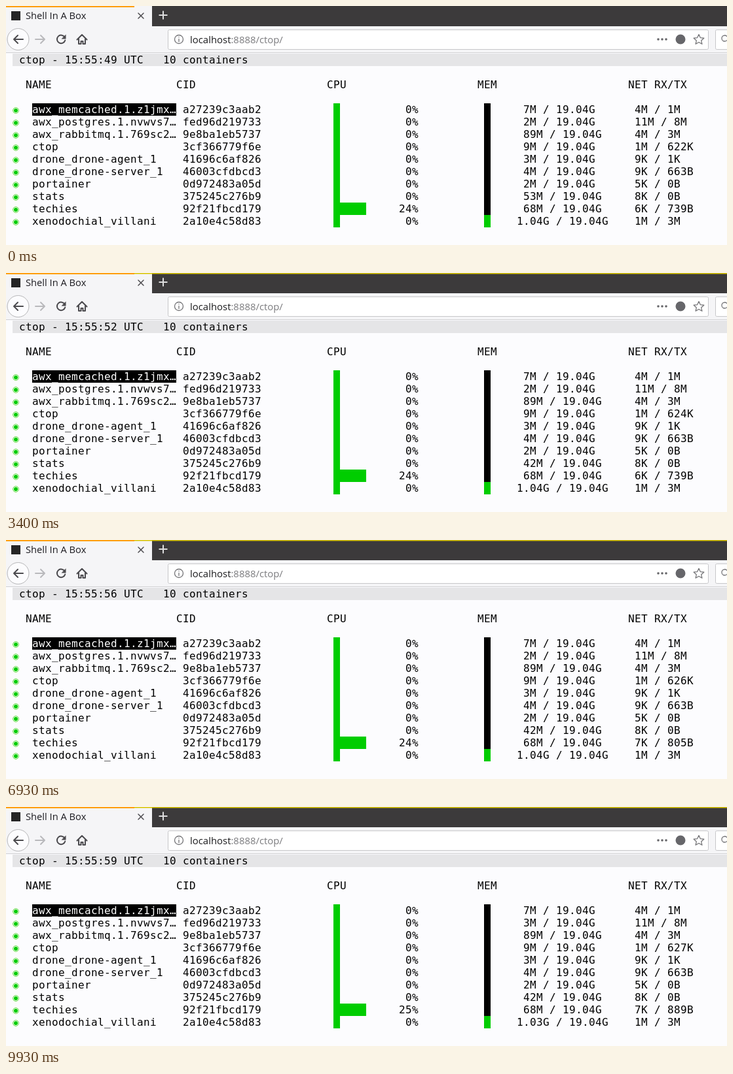
These frames come from a looping animation (1101x366 px, 9990 ms). An HTML page:

```html
<!DOCTYPE html>
<html lang="en">
<head>
<meta charset="utf-8">
<title>ctop</title>
<style>
  html, body { margin: 0; width: 100%; height: 100%; overflow: hidden; background: #fcfcfe; }
  svg { display: block; }
  text { white-space: pre; }
  .ui { font-family: "Open Sans", sans-serif; }
  .term { font: 16px "DejaVu Sans Mono", monospace; letter-spacing: .367px; }
  .icon { fill: none; stroke: #4c4b4f; stroke-width: 2; stroke-linecap: round; stroke-linejoin: round; }
  .thin { stroke-width: 1.5; }
</style>
</head>
<body>
<svg width="1101" height="366" viewBox="0 0 1101 366">
  <!-- tab strip -->
  <rect width="1101" height="31" fill="#3c3a3b"/>
  <rect width="223" height="31" fill="#f5f5f7"/>
  <rect width="196" height="2" fill="#ffa00a"/>
  <rect id="edge" x="196" width="905" height="1.5" fill="#d8c400"/>
  <rect x="8" y="8" width="14" height="14" fill="#252525"/>
  <text class="ui" x="30" y="20" font-size="14.7" fill="#1c1b20">Shell In A Box</text>
  <path class="icon thin" d="M202 11l8 8m0-8l-8 8"/>
  <path d="M233.500 14h13M240 7.500v13" stroke="#dedede" stroke-width="2"/>

  <!-- toolbar -->
  <rect y="31" width="1101" height="41" fill="#f5f5f7"/>
  <path d="M0 71.500H1101" stroke="#cfcfd2"/>
  <circle cx="18.500" cy="51" r="16.500" fill="#fcfcfe" stroke="#b4b4b6"/>
  <path class="icon" d="M26 51H12m6-6l-6 6 6 6"/>
  <path class="icon" style="stroke:#b9b9bc" d="M45 51h14m-6-6l6 6-6 6"/>
  <path class="icon" d="M89.500 47.500a6.300 6.300 0 1 0 .8 5"/>
  <path d="M91.500 43.500v7h-7z" fill="#4c4b4f"/>
  <path class="icon" d="M108.500 51.500L116 44l7.500 7.500M111 50.500V58h3.500v-4h3v4h3.500v-7.500"/>
  <rect x="247.500" y="36.500" width="825" height="30" rx="2" fill="#fff" stroke="#c6c6c9"/>
  <rect x="1083.500" y="36.500" width="30" height="30" rx="2" fill="#fff" stroke="#c6c6c9"/>
  <g class="icon" style="stroke:#747477;stroke-width:1.3">
    <circle cx="264" cy="51" r="6.500"/>
    <path d="M264 50.500v4M264 47.500v.2"/>
    <circle cx="1097.500" cy="49.500" r="4.500"/>
    <path d="M1058 43.500l2.300 5.100 5.500.6-4.100 3.700 1.200 5.400-4.900-2.800-4.900 2.800 1.200-5.400-4.100-3.700 5.500-.6z"/>
  </g>
  <text class="ui" x="281" y="56.500" font-size="14.9" fill="#1b1b1d">localhost<tspan fill="#7b7b7e">:8888/ctop/</tspan></text>
  <g fill="#66666a">
    <circle cx="996" cy="51" r="1.800"/><circle cx="1002" cy="51" r="1.800"/><circle cx="1008" cy="51" r="1.800"/>
    <circle cx="1030" cy="51" r="7.500"/>
  </g>

  <!-- terminal -->
  <rect x="10" y="73" width="1091" height="19" fill="#e5e5e7"/>
  <g id="screen" class="term"></g>
</svg>
<script>
(() => {
  const LOOP = 9990, FIRST = 670, TICK = 1000;
  const GREEN = '#00cd00';
  const CELL = 10, LINE = 19, LEFT = 10, TOP = 73;
  const screenEl = document.getElementById('screen');
  const edge = document.getElementById('edge');

  // name, container id, cpu, memory, network
  const rows = [
    ['awx_memcached.1.z1jmx…', 'a27239c3aab2', '0%', '7M', '4M / 1M'],
    ['awx_postgres.1.nvwvs7…', 'fed96d219733', '0%', '2M', '11M / 8M'],
    ['awx_rabbitmq.1.769sc2…', '9e8ba1eb5737', '0%', '89M', '4M / 3M'],
    ['ctop', '3cf366779f6e', '0%', '9M', '1M / 622K'],
    ['drone_drone-agent_1', '41696c6af826', '0%', '3M', '9K / 1K'],
    ['drone_drone-server_1', '46003cfdbcd3', '0%', '4M', '9K / 663B'],
    ['portainer', '0d972483a05d', '0%', '2M', '5K / 0B'],
    ['stats', '375245c276b9', '0%', '53M', '8K / 0B'],
    ['techies', '92f21fbcd179', '24%', '68M', '6K / 739B'],
    ['xenodochial_villani', '2a10e4c58d83', '0%', '1.04G', '1M / 3M']
  ];
  const CPU = 2, MEM = 3, NET = 4;

  // tick, row, field, new value
  const updates = [
    [2, 3, NET, '1M / 623K'], [2, 7, CPU, '1%'], [2, 7, MEM, '42M'], [2, 8, CPU, '25%'],
    [3, 3, NET, '1M / 624K'], [3, 7, CPU, '0%'], [3, 8, CPU, '24%'],
    [4, 3, NET, '1M / 625K'], [4, 8, CPU, '25%'], [4, 8, NET, '7K / 805B'],
    [6, 3, NET, '1M / 626K'], [6, 8, CPU, '24%'],
    [10, 1, MEM, '3M'], [10, 3, NET, '1M / 627K'], [10, 8, CPU, '25%'],
    [10, 8, NET, '7K / 889B'], [10, 9, MEM, '1.03G']
  ];

  function add(tag, attrs, text = '') {
    const el = document.createElementNS('http://www.w3.org/2000/svg', tag);
    for (const key in attrs) el.setAttribute(key, attrs[key]);
    el.textContent = text;
    return screenEl.appendChild(el);
  }
  const colX = col => LEFT + col * CELL;
  const lineY = line => TOP + line * LINE;
  const write = (col, line, text, fill = '#000') =>
    add('text', { x: colX(col), y: lineY(line) + 15, fill }, text);
  const block = (col, line, cols, lines, fill) =>
    add('rect', { x: colX(col), y: lineY(line), width: cols * CELL, height: lines * LINE, fill });

  const clock = write(1, 0, '');
  [[2, 'NAME'], [25, 'CID'], [48, 'CPU'], [71, 'MEM'], [94, 'NET RX/TX']]
    .forEach(([col, title]) => write(col, 2, title));

  block(3, 4, 22, 1, '#000');
  block(49, 4, 1, 10, GREEN);
  block(49, 12, 5, 1, GREEN);
  block(72, 4, 1, 9, '#000');
  block(72, 13, 1, 1, GREEN);

  const cells = rows.map(([name, id], i) => {
    const line = i + 4, cy = lineY(line) + 11;
    add('circle', { cx: 15, cy, r: 4.4, fill: 'none', stroke: '#5edc3c' });
    add('circle', { cx: 15, cy, r: 3, fill: GREEN });
    write(3, line, name, i ? '#000' : '#fff');
    write(26, line, id);
    return { cpu: write(60, line, ''), mem: write(78, line, ''), net: write(95, line, '') };
  });

  function render(tick) {
    const now = rows.map(row => row.slice());
    for (const [at, row, field, value] of updates)
      if (at <= tick) now[row][field] = value;

    clock.textContent = `ctop - 15:55:${49 + tick} UTC   10 containers`;
    now.forEach((row, i) => {
      const { cpu, mem, net } = cells[i];
      cpu.textContent = row[CPU];
      cpu.setAttribute('x', colX(62 - row[CPU].length));
      mem.textContent = row[MEM] + ' / 19.04G';
      mem.setAttribute('x', colX(row[MEM].length > 3 ? 77 : 78));
      net.textContent = row[NET];
    });
  }

  let shown = -1;
  function frame() {
    const t = performance.now() % LOOP;
    const tick = t < FIRST ? 0 : 1 + Math.floor((t - FIRST) / TICK);
    edge.setAttribute('visibility', t < 70 ? 'hidden' : 'visible');
    if (tick !== shown) render(shown = tick);
    requestAnimationFrame(frame);
  }
  frame();
})();
</script>
</body>
</html>
```
